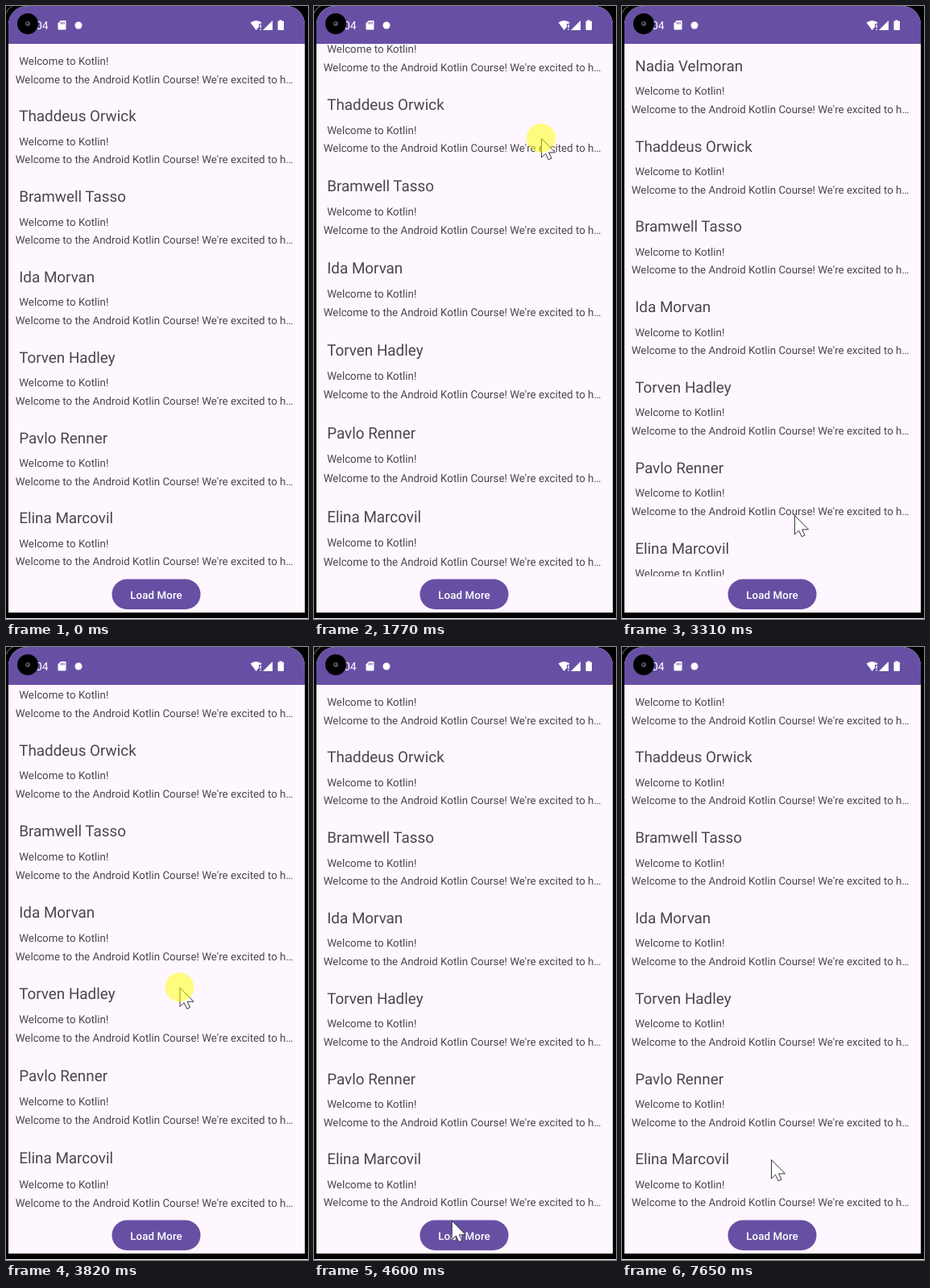
Recreate the animation shown at these times as an HTML page. Size 375 by 761 pixels, loop 8 s.

```html
<!DOCTYPE html>
<html lang="en">
<head>
<meta charset="utf-8">
<title>Message list</title>
<style>
  html, body { margin: 0; width: 100%; height: 100%; overflow: hidden; background: #000; }
  svg { display: block; width: 100vw; height: 100vh; }
  text { font-family: Roboto, "Open Sans", sans-serif; font-size: 13.34px; fill: #49454f; text-rendering: geometricPrecision; }
  .name { font-size: 18.85px; }
  .white { fill: #fff; }
  .label { font-weight: 500; letter-spacing: .1px; text-anchor: middle; }
</style>
</head>
<body>
<svg viewBox="0 0 375 761">
  <defs>
    <clipPath id="screen"><rect x="3" width="368" height="700" rx="23"/><rect x="3" y="600" width="368" height="153"/></clipPath>
    <clipPath id="viewport"><rect x="3" y="47" width="368" height="661"/></clipPath>
  </defs>
  <rect width="375" height="761" fill="#000"/>
  <rect y="760" width="375" height="1" fill="#fff"/>
  <path d="M0 9Q2 3 8 0" fill="none" stroke="#77757c"/>
  <g clip-path="url(#screen)">
    <rect width="375" height="761" fill="#fef7ff"/>
    <rect width="375" height="47" fill="#6750a4"/>
  </g>

  <!-- status bar -->
  <text class="white" x="37" y="29" style="font-size:14px">04</text>
  <circle cx="27" cy="22" r="13" fill="#000"/>
  <circle cx="27" cy="22" r="3" fill="#55555c"/>
  <circle cx="26.5" cy="21.5" r="1.2" fill="#17171b"/>
  <path class="white" d="M68 18H73.5Q74.5 18 74.5 19V28.5Q74.5 29.5 73.5 29.5H65.5Q64.5 29.5 64.5 28.5V21.5Z"/>
  <path d="M68.2 20V22.5M70.2 20V22.5M72.2 20V22.5" stroke="#6750a4"/>
  <circle class="white" cx="90" cy="24" r="4.5"/>
  <path class="white" d="M303.5 20.5Q310.5 15.5 317.5 20.5L316.5 22H314V26L310.5 30Z"/>
  <path d="M316 23V27M316 28.3V29.8" stroke="#fff" stroke-width="1.4"/>
  <path class="white" d="M331 18V30H319Z"/>
  <path class="white" d="M339.3 17.5H342.7V18.8H345V29Q345 30 344 30H338.5Q337.5 30 337.5 29V18.8H339.3Z"/>

  <g id="list" clip-path="url(#viewport)"></g>

  <rect x="131.5" y="711.5" width="110" height="37.5" rx="18.75" fill="#6750a4"/>
  <rect id="ripple" x="131.5" y="711.5" width="110" height="37.5" rx="18.75" fill="#fff"/>
  <text class="white label" x="186.5" y="735.5">Load More</text>

  <g id="cursor">
    <path d="M.5 .5V24L5.6 19.2L9.2 26.8L13 25.1L9.6 17.9H17.5Z" fill="#fff" stroke="#222" stroke-width=".9"/>
    <circle id="touch" r="18" fill="#ff0" fill-opacity=".5"/>
  </g>
</svg>
<script>
const LOOP = 8000, FIRST_BEAT = 361, BEAT = 127.2;
const ROW = 99.8, TOP = 47, BOTTOM = 708, REACH = 630;
const TRAVEL = 37.2, ELASTIC = .0515, BOUNCE = 2.5;
const names = ["Nadia Velmoran", "Thaddeus Orwick", "Bramwell Tasso", "Ida Morvan",
  "Torven Hadley", "Pavlo Renner", "Elina Marcovil"];
const byId = id => document.getElementById(id);

// Pointer moves, timed in beats
const moves = [
  { from: 0, to: 2, x: 275, y: 549 },
  { from: 4, to: 7, x: 257, y: 414 },
  { from: 7, to: 11, x: 282, y: 164 },
  { from: 12, to: 15, x: 275, y: 205 },
  { from: 18, to: 21, x: 184, y: 726 },
  { from: 21, to: 23, x: 214, y: 632 },
  { from: 25, to: 28, x: 216, y: 349 },
  { from: 28, to: 32, x: 171, y: 705 },
  { from: 32, to: 35, x: 170, y: 731 },
  { from: 54, to: 57, x: 185, y: 636 },
];

function ramp(beat, from, to) {
  const f = Math.min(1, Math.max(0, (beat - from) / (to - from)));
  return f * f * (3 - 2 * f);
}

function pointerAt(beat) {
  let x = 339, y = 667;
  for (const move of moves) {
    const f = ramp(beat, move.from, move.to);
    x += (move.x - x) * f;
    y += (move.y - y) * f;
  }
  return { x, y };
}

// Upward finger travel between press and release
function dragged(beat, press, release) {
  if (beat < press) return 0;
  return pointerAt(press).y - pointerAt(Math.min(beat, release)).y;
}

function listAt(beat) {
  const first = dragged(beat, 6, 11), second = dragged(beat, 24, 28);
  const excess = Math.max(0, second - TRAVEL);
  const pull = ELASTIC * (first * (1 - ramp(beat, 11, 14)) + excess * (1 - ramp(beat, 28, 32)));
  const bounce = BOUNCE * Math.max(0, 1 - Math.abs(beat - 15));
  const offset = TRAVEL * ramp(beat, 12, 15) - Math.min(TRAVEL, second);
  return { offset, pull: pull - bounce };
}

const lines = [];
function addLine(text, x, y, cls) {
  const el = document.createElementNS("http://www.w3.org/2000/svg", "text");
  el.textContent = text;
  if (cls) el.setAttribute("class", cls);
  byId("list").append(el);
  lines.push({ el, x, y });
}
names.forEach((name, i) => {
  const y = i * ROW;
  addLine(name, 16.2, y + 43.6, "name");
  addLine("Welcome to Kotlin!", 16.2, y + 72.9);
  addLine("Welcome to the Android Kotlin Course! We're excited to h…", 11.7, y + 95.5);
});

// Overscroll stretches the list away from the edge it is pulled from
function placeLine({ el, x, y }, { offset, pull }) {
  const base = y + offset;
  const u = (pull > 0 ? base - TOP : BOTTOM - base) / REACH;
  const shift = -pull * (1 - u * u);
  const scale = 1 + 2 * Math.abs(pull) * u / REACH;
  el.setAttribute("transform", `translate(${x} ${base + shift}) scale(1 ${scale})`);
}

function draw(time) {
  // The picture holds still between beats
  const beat = Math.floor((time - FIRST_BEAT) / BEAT);
  const list = listAt(beat), { x, y } = pointerAt(beat);
  lines.forEach(line => placeLine(line, list));

  byId("cursor").setAttribute("transform", `translate(${x} ${y})`);
  byId("cursor").style.display = beat < 0 ? "none" : "";
  const held = (press, release) => beat >= press && beat < release;
  byId("touch").style.display = held(6, 14) || held(24, 29) || held(38, 39) ? "" : "none";
  byId("ripple").setAttribute("opacity", beat < 41 ? 0 : .16 * (1 - ramp(beat, 41, 44)));
}

const begin = performance.now();
function frame() {
  draw((performance.now() - begin) % LOOP);
  requestAnimationFrame(frame);
}
frame();
</script>
</body>
</html>
```
